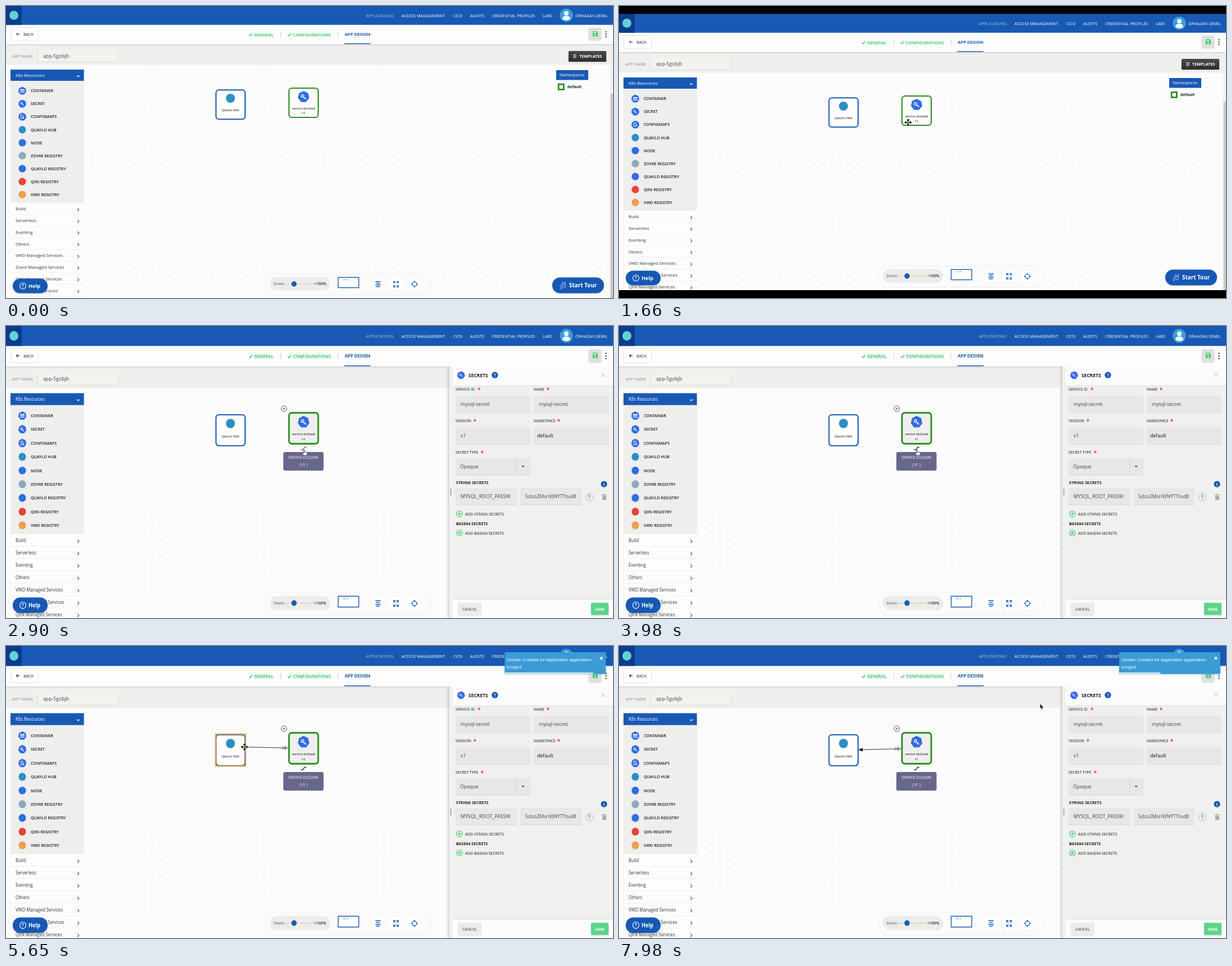
Animation of 1079 by 519 pixels, one loop 8 s. Source, as an HTML page:

```html
<!DOCTYPE html>
<html lang="en">
<head>
<meta charset="utf-8">
<title>App design</title>
<style>
html, body { margin: 0; width: 100%; height: 100%; overflow: hidden; background: #000; }
svg { display: block; }
text { font-family: "Open Sans", "Noto Sans", sans-serif; white-space: pre; }
.serif { font-family: "Liberation Serif", "Times New Roman", serif; }
.arial { font-family: "Liberation Sans", Arial, sans-serif; }
</style>
</head>
<body>
<svg id="stage" width="1079" height="519" viewBox="0 0 1079 519">
  <defs>
    <pattern id="dots" width="13.3" height="13.3" patternUnits="userSpaceOnUse" y="1">
      <rect x="6" y="6" width="1.2" height="1.2" fill="#e8e4c0"/>
    </pattern>
    <linearGradient id="dark" x2="0" y2="1"><stop stop-color="#4a4a4a"/><stop offset="1" stop-color="#2c2c2c"/></linearGradient>
    <linearGradient id="edge"><stop stop-color="#999" stop-opacity="0"/><stop offset="1" stop-color="#999" stop-opacity=".4"/></linearGradient>
    <filter id="shadow" x="-20%" y="-30%" width="140%" height="170%">
      <feDropShadow dx="0" dy=".8" stdDeviation="1" flood-opacity=".2"/>
    </filter>
    <filter id="faint" x="-5%" y="-30%" width="110%" height="170%">
      <feDropShadow dx="0" dy="0" stdDeviation="1.4" flood-opacity=".1"/>
    </filter>
  </defs>
  <svg id="view" width="1079" preserveAspectRatio="none">
    <g id="top"></g>
    <g id="bottom"></g>
  </svg>
  <g id="panel"></g>
  <g id="overlay"></g>
  <g id="toast"></g>
  <g id="cursors"></g>
</svg>
<script>
const BLUE = '#1859b4', GREEN = '#41cd72', KUBE = '#326ce5', INK = '#2a2a2a';
const $ = id => document.getElementById(id);

const text = (x, y, str, size, fill = INK, weight = 400, extra = '') =>
  `<text x="${x}" y="${y + size * 0.36}" font-size="${size}" fill="${fill}" font-weight="${weight}" ${extra}>${str}</text>`;
const rect = (x, y, w, h, fill, extra = '') =>
  `<rect x="${x}" y="${y}" width="${w}" height="${h}" fill="${fill}" ${extra}/>`;
const circle = (x, y, r, fill, extra = '') => `<circle cx="${x}" cy="${y}" r="${r}" fill="${fill}" ${extra}/>`;
const line = (d, stroke, width = 1, extra = '') =>
  `<path d="${d}" fill="none" stroke="${stroke}" stroke-width="${width}" ${extra}/>`;
const shape = (d, fill) => `<path d="${d}" fill="${fill}"/>`;
const at = (x, y, body, scale = 1) => `<g transform="translate(${x} ${y}) scale(${scale})">${body}</g>`;
const MIDDLE = 'text-anchor="middle"', SHADOW = 'filter="url(#shadow)"', FAINT = 'filter="url(#faint)"';

function heptagon(x, y, r, glyph) {
  const points = Array.from({ length: 7 }, (_, i) => {
    const a = i * 2 * Math.PI / 7 - Math.PI / 2;
    return `${(x + r * Math.cos(a)).toFixed(2)},${(y + r * Math.sin(a)).toFixed(2)}`;
  }).join(' ');
  return `<polygon points="${points}" fill="${KUBE}" stroke="${KUBE}" stroke-width="1" stroke-linejoin="round"/>`
    + at(x, y, glyph, r / 7);
}
const KEY = circle(-1.4, -1, 1.6, 'none', 'stroke="#fff" stroke-width="1"') + line('M-.2 .2L3 3.2M1.6 1.9L2.6 1', '#fff', 1);
const BOX = line('M-3.2 -2.5H3.2V2.8H-3.2ZM-3.2 -1H3.2M-1.4 .8H1.4', '#fff', 1);
const FILE = line('M-2.8 -3.2H1V-.5M-2.8 -3.2V3H-.5', '#fff', .9) + circle(1.6, 1.7, 1.5, '#fff');

function topParts() {
  let s = rect(0, 0, 1079, 519, '#fcfcfc') + rect(0, 104, 1079, 415, 'url(#dots)')
    + rect(0, 68, 1079, 36.5, '#efefed') + rect(0, 34, 1079, 34, '#fdfdfd', SHADOW)
    + rect(0, 0, 1079, 33.5, BLUE) + rect(0, 0, 28, 33.5, '#0b3c8c') + circle(14, 16.5, 8, '#62d0d6');

  const nav = [[640, 'APPLICATIONS'], [703, 'ACCESS MANAGEMENT'], [795, 'CICD'], [825, 'AUDITS'],
    [864, 'CREDENTIAL PROFILES'], [954, 'LABS'], [1012, 'ORHAZAN DEMIL']];
  nav.forEach(([x, label], i) => s += text(x, 17, label, 7.25, i ? '#fff' : '#a9c3e8', i ? 500 : 400));
  s += circle(996, 16.5, 11.7, '#3d9edb') + circle(996, 13, 4, '#fff') + shape('M989 23.5q0-6 7-6t7 6q-7 4-14 0z', '#fff');

  s += rect(8.5, 38.5, 49, 23.5, '#fff', 'rx="2" stroke="#e2e2e2"')
    + line('M24 50H18.5M21 47.5L18.5 50L21 52.5', INK, 1) + text(31, 50.3, 'BACK', 7.3, INK, 500)
    + text(441, 51, 'GENERAL', 7.6, GREEN, 700) + text(510, 51, 'CONFIGURATIONS', 7.55, GREEN, 700)
    + text(602, 50.5, 'APP DESIGN', 7.75, BLUE, 700)
    + [432, 501].map(x => line(`M${x} 51l2 2.3l4-4.6`, GREEN, 1.4)).join('')
    + line('M488.5 46V56M590 46V56', '#ccc') + rect(601.5, 66.2, 46.5, 1.4, BLUE)
    + rect(1036, 39, 22, 21.5, '#dfdfdf', `rx="1.5" ${SHADOW}`)
    + shape('M1043 45h7l2 2v7h-9z', GREEN) + rect(1044.5, 46.2, 4.5, 2, '#e8f8ec') + circle(1047.4, 51.2, 1.4, '#e8f8ec')
    + [46, 50.3, 54.6].map(y => circle(1066.5, y, 1.3, '#555')).join('');

  s += text(11.5, 89, 'APP NAME', 7.45, '#8f8f8f', 500) + rect(56, 78, 143, 21.5, '#f2f2ef')
    + line('M56 78V99.5H199.5V78', '#dcdcd8') + text(66, 89, 'app-5gobjb', 8.7, '#444')
    + rect(1000, 80, 67, 19, 'url(#dark)', `rx="1.5" ${SHADOW}`)
    + line('M1008 86.7h6M1008 89.2h6M1008 91.7h6', '#fff', 1) + text(1019, 89.5, 'TEMPLATES', 7.25, '#fff', 700);

  s += rect(978, 114, 57, 17.5, BLUE, 'rx="1"') + text(984, 122.7, 'Namespaces', 7.4, '#fff')
    + rect(982.2, 139.2, 9.2, 9.2, '#fff', 'stroke="#2c8d1f" stroke-width="2.8"') + text(998, 143.5, 'default', 7, '#222', 700)
    + rect(1074, 104, 5, 415, '#f1f1f1') + rect(1074.5, 156, 4.5, 363, '#c9c9c9');

  s += rect(8, 133, 130.5, 217, '#eeeeed') + rect(8, 113, 130.5, 20, BLUE)
    + text(17, 123, 'K8s Resources', 7.75, '#fff') + line('M126 123.3l2.5 2.5l2.5-2.5', '#fff', 1.2);
  const items = [['CONTAINER', BOX], ['SECRET', KEY], ['CONFIGMAPS', FILE], ['QUAYLO HUB', '#2c8fc3'], ['NODE', KUBE],
    ['ZOVRE REGISTRY', '#8fa9b8'], ['QUAYLO REGISTRY', KUBE], ['QXN REGISTRY', '#ea4335'], ['VWD REGISTRY', '#eea04c']];
  items.forEach(([label, icon], i) => {
    const y = 150.8 + 23.05 * i;
    s += (i < 3 ? heptagon(29, y, 6.8, icon) : circle(29, y, 6.6, icon)) + text(44, y, label, 7.1, '#1c1c1c', 600);
  });
  const groups = ['Build', 'Serverless', 'Eventing', 'Others', 'VWD Managed Services', 'Zovre Managed Services',
    'QXN Managed Services', 'All Managed Services'];
  groups.forEach((label, i) => {
    const y = 350 + 20.77 * i;
    s += rect(8, y, 130.5, 20.77, '#fdfdfd') + line(`M8 ${y + 20.5}H138.5`, '#ececf0')
      + text(17, y + 10.6, label, 7.7, '#333', 500) + line(`M127 ${y + 9.2}l2.8 2.8l-2.8 2.8`, '#555', 1.1);
  });

  s += rect(373.3, 149.3, 51.7, 52, '#fff', `rx="5" stroke="${BLUE}" stroke-width="2"`) + circle(399, 164, 8, '#2c8fc3')
    + text(399, 185, 'Quaylo Hub', 6.4, '#111', 400, `class="serif" ${MIDDLE}`)
    + rect(503, 146, 52, 52, '#fff', 'id="secret" rx="5" stroke="#2c8d1f"')
    + heptagon(529, 161.3, 9.8, KEY)
    + ['service-do2umk', 'v1'].map((t, i) => text(529, 181.5 + 8 * i, t, 6.4, '#111', 400, `class="serif" ${MIDDLE}`)).join('');
  return s;
}

function bottomParts() {
  let s = rect(463, 477, 291, 36, '#fbfbfb', `rx="14" ${FAINT}`) + rect(469, 482, 107, 24, '#ececea', 'rx="12"')
    + text(475.5, 494, 'Zoom', 6.8, '#888', 700) + text(497, 493.5, '-', 7, '#777', 700)
    + line('M501 494H548', '#dcd2a4', 1.2) + circle(512, 494, 4.7, BLUE) + text(548, 494, '+100%', 6.8, INK, 600)
    + rect(590.5, 482.4, 36.6, 18.2, '#fff', `stroke="${BLUE}" stroke-width="1.4"`)
    + rect(600, 485.5, 2, 2, '#5ba6dc') + rect(605.5, 485.2, 2, 2, '#6cab64')
    + [661, 693, 726].map(x => circle(x, 494.5, 12.5, '#fff', 'stroke="#f4f4f4"')).join('')
    + line('M656.5 490h9.5M658 493h6.5M656.5 496h9.5M658 499h6.5', BLUE, 1.4)
    + line('M689 493v-3.5h3.5M697.5 493v-3.5h-3.5M689 496v3.5h3.5M697.5 496v3.5h-3.5M689.5 490l2.7 2.7M697 490l-2.7 2.7M689.5 499l2.7-2.7M697 499l-2.7-2.7', BLUE, 1.2)
    + circle(726, 494.5, 4, 'none', `stroke="${BLUE}" stroke-width="1.2"`)
    + line('M726 488.5v3M726 497.5v3M720 494.5h3M729 494.5h3', BLUE, 1.3);
  s += rect(12, 484.5, 62, 26, BLUE, `rx="13" ${SHADOW}`) + circle(30, 497.5, 5.5, 'none', 'stroke="#fff" stroke-width="1.1"')
    + text(30, 497.6, '?', 8, '#fff', 700, MIDDLE) + text(40, 497.5, 'Help', 9.2, '#fff', 700);
  s += rect(971, 482.5, 92, 28, BLUE, `rx="14" ${SHADOW}`)
    + line('M986.5 494l3 5.5q2.5 3 5-.5l-.5-5.5l-1.5 1.5l-3.5-4.5M988 492l3.5 5M985 497l3 4.5M992 490.5q3 .3 3.2 2.5M985 501q.8 2 2.8 2.2', '#dce9fb', .9)
    + text(1001, 496.5, 'Start Tour', 9.9, '#fff', 700);
  return s;
}

function panelParts() {
  const field = (x, y, w, str, color = '#444', weight = 400, pad = 9) => rect(x, y, w, 30, '#e7e7e7')
    + line(`M${x} ${y + 30}H${x + w}`, '#dadada')
    + `<svg x="${x}" y="${y}" width="${w - 9}" height="30">${text(pad, 15.3, str, 8.75, color, weight)}</svg>`;
  const label = (x, y, str, star) => text(x, y, str, 6.6, '#4a4a5a', 600) + text(star, y + .5, '*', 11, '#ee4468', 700);
  const badge = (x, y, ch) => circle(x, y, 5.6, BLUE) + text(x, y, ch, 7.5, '#fff', 700, MIDDLE);
  const add = (y, str) => circle(806, y, 5.2, 'none', `stroke="${GREEN}" stroke-width="1.2"`)
    + line(`M803 ${y}h6M806 ${y - 3}v6`, GREEN, 1.3) + text(816, y + .5, str, 6.75, '#4a4a5a', 600);
  return rect(782, 72, 6, 447, 'url(#edge)') + rect(788, 72, 291, 447, '#f1f1f1') + rect(794, 72, 285, 447, '#f0f0ef')
    + rect(794, 72, 285, 34.5, '#fbfbfb') + line('M794 106.5H1079', '#ddd')
    + rect(794, 486, 285, 33, '#fcfcfc') + line('M794 486H1079', '#ddd') + rect(789.5, 289, 2.5, 13, '#bbb', 'rx="1"')
    + heptagon(809, 87.5, 6.6, KEY) + text(822, 87.5, 'SECRETS', 8.5, '#222', 700) + badge(869, 87.2, '?')
    + line('M1058 84l6.5 6.5M1064.5 84l-6.5 6.5', '#d2d2d2', 1.1)
    + label(799, 113, 'SERVICE ID', 838) + label(938, 113, 'NAME', 960.5)
    + field(799, 124, 133, 'mysql-secret') + field(938, 124, 133, 'mysql-secret')
    + label(799, 169, 'VERSION', 830.5) + label(938, 169, 'NAMESPACE', 979.5)
    + field(799, 180, 133, 'v1') + field(938, 180, 133, 'default', '#111', 500, 6)
    + label(799, 225, 'SECRET TYPE', 843.5) + field(799, 235, 133, 'Opaque', '#444', 400, 8)
    + line('M907.5 235V265', '#cfcfcf') + shape('M916.5 248.5h5.4l-2.7 3z', '#444')
    + text(800, 278, 'STRING SECRETS', 7.2, '#222', 700) + badge(1063, 281, 'i')
    + field(799, 288, 109, 'MYSQL_ROOT_PASSW') + field(914, 288, 109, '5dzo2MsriVJNYTTtud8p')
    + circle(1037, 304, 6.8, 'none', 'stroke="#bbb"') + line('M1037 308v-7M1034.5 303l2.5-2.7l2.5 2.7', '#aaa', 1.4)
    + shape('M1060 302h7v7h-7zM1059 299.5h9v1.5h-9zM1062 298.5h3v1h-3z', '#aaa')
    + add(334, 'ADD STRING SECRETS') + text(800, 351, 'BASE64 SECRETS', 7.1, '#222', 700) + add(368, 'ADD BASE64 SECRETS')
    + rect(804, 492, 40, 21.5, '#ececec', `rx="1.5" ${SHADOW}`) + text(824, 503, 'CANCEL', 7, '#333', 500, MIDDLE)
    + rect(1040, 492, 31, 21.5, '#5bd58a', `rx="1.5" ${SHADOW}`) + text(1055.5, 503, 'SAVE', 7, '#fff', 700, MIDDLE);
}

const overlayParts = () =>
  rect(372.5, 156.5, 53.5, 57, 'none', 'id="highlight" stroke="#eda649" stroke-width="2"')
  + '<g id="link"><path id="wire" stroke="#333" stroke-width="1"/><path id="head" d="M0 0L7 -3.2V3.2Z"/>'
  + `<g id="scissors">${circle(2.6, -2, 1.2, 'none', 'stroke="#555" stroke-width=".8"')
    + circle(2.6, 2, 1.2, 'none', 'stroke="#555" stroke-width=".8"')
    + line('M1.6 -1.3L-4 2.6M1.6 1.3L-4 -2.6', '#555', .9)}</g></g>`
  + circle(494, 147, 5, '#fff', 'stroke="#444" stroke-width=".9"') + line('M492.2 145.2l3.6 3.6M495.8 145.2l-3.6 3.6', '#444', .9)
  + '<path id="handle" d="M525 219.8h2.2q1.2 0 2-2t2-2.2h2" fill="none" stroke-width="1.7" stroke-linecap="round"/>'
  + rect(493, 224, 71.5, 33, '#67678b', 'rx="3"')
  + text(528.8, 234, 'SERVICE-DO2UMK', 6.35, '#fff', 500, MIDDLE) + text(528.8, 246.8, '( V1 )', 6.35, '#fff', 500, MIDDLE);

const toastParts = () => rect(889, 11, 180, 38.7, '#3a9bd5', `rx="1" ${SHADOW}`)
  + ['Cluster Created for Application application-', 'lcmgo3'].map((t, i) =>
    text(893, 24 + 13 * i, t, 8.06, '#fff', 400, 'class="arial"')).join('')
  + line('M1058.7 19.6l4.4 4.4M1063.1 19.6l-4.4 4.4', '#fff', 1.6)
  + rect(889, 47, 180, 2.7, 'rgba(255,255,255,.75)', 'id="bar"');

const arm = 'M0 0V-5M-2 -3.3L0 -5.6L2 -3.3';
const cursorParts = () =>
  `<g id="move">${[0, 90, 180, 270].map(a => `<g transform="rotate(${a})">${line(arm, '#fff', 2.6) + line(arm, '#111', 1.4)}</g>`).join('')}</g>`
  + `<g id="hand"><path d="M-1 .3q1.2-1 1.8.4v3l4 1q1 .5.7 2l-.9 3.5h-5.3l-3-4q-.4-1.3 1-1l1.7 1z" fill="#fff" stroke="#333" stroke-width=".9"/></g>`
  + `<g id="arrow"><path d="M0 0V9.2L2.1 7.4L3.6 10.7L5.2 10L3.8 6.9H6.6Z" fill="#111" stroke="#fff" stroke-width=".6"/></g>`;

$('top').innerHTML = topParts();
$('bottom').innerHTML = bottomParts();
$('panel').innerHTML = panelParts();
$('overlay').innerHTML = overlayParts();
$('toast').innerHTML = toastParts();
$('cursors').innerHTML = cursorParts();

const LOOP = 8000, BARS = 120, OPEN = 2790, PRESS = 3930, DRAG = 4150, TOAST = 5020, HOVER = 5190, DROP = 6700;
const path = [[BARS, 514, 207], [2300, 514, 207], [2600, 537, 224], [2900, 530, 220], [DRAG, 530, 220],
  [4950, 445, 181], [5110, 432, 179], [5300, 424, 179.5], [6900, 424, 179.5], [7850, 748.5, 102.5]];

function pointer(t) {
  if (t <= path[0][0]) return path[0].slice(1);
  for (let i = 1; i < path.length; i++) {
    const [t0, x0, y0] = path[i - 1], [t1, x1, y1] = path[i];
    if (t < t1) {
      const u = (t - t0) / (t1 - t0);
      return [x0 + (x1 - x0) * u, y0 + (y1 - y0) * u];
    }
  }
  return path[path.length - 1].slice(1);
}

function easeOut(x) {
  const bez = (u, a, b) => 3 * u * (1 - u) ** 2 * a + 3 * u * u * (1 - u) * b + u ** 3;
  let lo = 0, hi = 1;
  for (let i = 0; i < 20; i++) {
    const mid = (lo + hi) / 2;
    if (bez(mid, .215, .355) < x) lo = mid; else hi = mid;
  }
  return bez(lo, .61, 1);
}

const bounce = [[0, 1686], [.6, -14], [.75, 5.6], [.9, -2.8], [1, 0]];
function bounceIn(p) {
  for (let i = 1; i < bounce.length; i++) {
    const [p0, x0] = bounce[i - 1], [p1, x1] = bounce[i];
    if (p < p1) return x0 + (x1 - x0) * easeOut((p - p0) / (p1 - p0));
  }
  return 0;
}

const show = (id, on) => { $(id).style.display = on ? '' : 'none'; };
const set = (id, attrs) => { for (const k in attrs) $(id).setAttribute(k, attrs[k]); };

// Point where the ray from a node's centre towards (x, y) leaves the node.
function border([cx, cy, w, h], x, y) {
  const dx = x - cx, dy = y - cy;
  const k = Math.min(w / Math.abs(dx || 1e-6), h / Math.abs(dy || 1e-6));
  return [cx + dx * k, cy + dy * k];
}
const SECRET = [529, 182, 27, 28.5], HUB = [399, 185, 27, 28.5];

function drawLink(t, x, y) {
  const tip = t < DROP ? [x, y] : border(HUB, SECRET[0], SECRET[1]);
  const from = border(SECRET, ...(t < DROP ? tip : HUB));
  const dx = from[0] - tip[0], dy = from[1] - tip[1], len = Math.hypot(dx, dy) || 1;
  const angle = Math.atan2(dy, dx) * 180 / Math.PI;
  set('wire', { d: `M${from}L${tip}` });
  set('head', { transform: `translate(${tip}) rotate(${angle})` });
  show('head', t < HOVER || t >= DROP);
  set('scissors', { transform: `translate(${from[0] - dx / len * 8} ${from[1] - dy / len * 8}) rotate(${angle})` });
  show('scissors', len > 20);
}

function draw(t) {
  const open = t >= OPEN, short = t >= BARS, barred = short && !open, height = short ? 491 : 519;
  set('view', { y: barred ? 14 : 0, height: barred ? 491 : 519, viewBox: `0 0 1079 ${height}` });
  set('bottom', { transform: `translate(0 ${height - 519})` });
  set('secret', { 'stroke-width': open ? 2.9 : 2.1, fill: open ? '#efefef' : '#fff' });
  show('panel', open);
  show('overlay', open);

  const [x, y] = pointer(t);
  show('link', t >= DRAG);
  drawLink(t, x, y);
  show('highlight', t >= HOVER && t < DROP);
  set('handle', { stroke: t < PRESS ? '#e0559b' : '#444' });

  const kind = t < OPEN ? 'move' : t < HOVER ? 'hand' : x < 430 ? 'move' : 'arrow';
  for (const id of ['move', 'hand', 'arrow']) {
    show(id, short && id === kind);
    set(id, { transform: `translate(${x} ${y})` });
  }

  const age = t - TOAST;
  show('toast', age >= 0);
  set('toast', { transform: `translate(${bounceIn(Math.max(0, age) / 700)} 0)`, opacity: Math.min(1, Math.max(0, age) / 420) });
  set('bar', { width: 180 * (1 - Math.max(0, age) / 5000) });
}

const start = performance.now();
function tick() {
  draw((performance.now() - start) % LOOP);
  requestAnimationFrame(tick);
}
draw(0);
requestAnimationFrame(tick);
</script>
</body>
</html>
```
